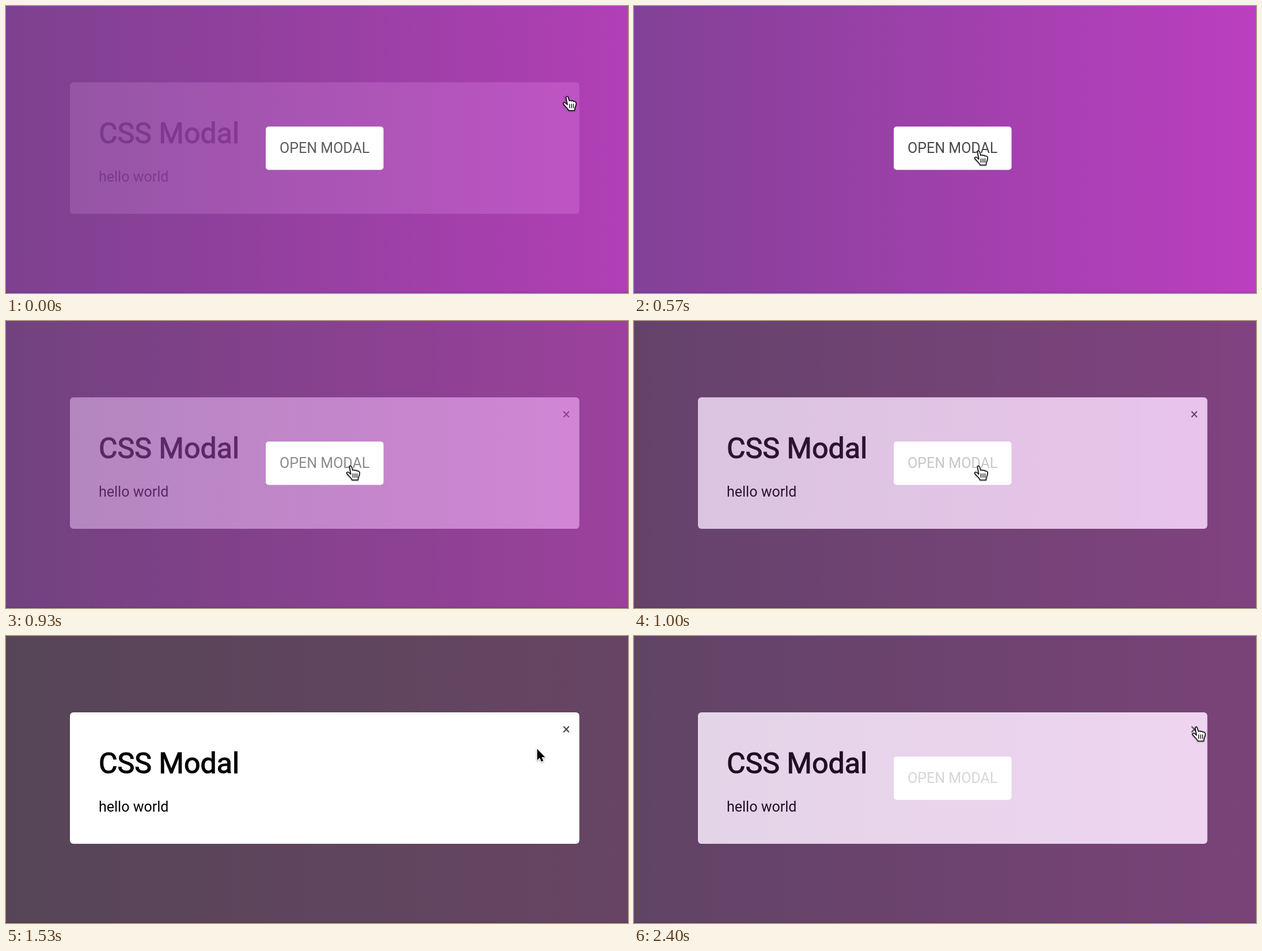
These frames come from a looping animation (1080 px wide and 500 px high, 2.43 s). An HTML page:

```html
<!DOCTYPE html>
<html lang="en">
<head>
<meta charset="utf-8">
<title>CSS Modal</title>
<style>
  html, body { margin: 0; width: 100%; height: 100%; overflow: hidden; }
  svg { display: block; width: 1080px; height: 500px; font: 25px Roboto, Arial, sans-serif; }
  .mid { text-anchor: middle; fill: #484848; }
  #cursor { filter: drop-shadow(0 1.5px 1px rgba(0, 0, 0, .4)); stroke-linejoin: round; stroke-linecap: round; }
</style>
</head>
<body>
<svg viewBox="0 0 1080 500">
  <defs>
    <linearGradient id="bg">
      <stop offset="0" stop-color="rgb(130,65,150)"/>
      <stop offset="1" stop-color="rgb(187,63,192)"/>
    </linearGradient>
  </defs>
  <rect width="1080" height="500" fill="url(#bg)"/>
  <rect x="451" y="210" width="204.5" height="75.5" rx="5" fill="#fff"/>
  <text class="mid" x="553.2" y="256.3">OPEN MODAL</text>

  <g id="modal">
    <rect width="1080" height="500" fill="rgb(70,71,63)" fill-opacity=".71"/>
    <rect x="111" y="133" width="884.5" height="229" rx="6" fill="#fff"/>
    <text x="161" y="238.5" font-size="50" stroke="#000" stroke-width="1.1">CSS Modal</text>
    <text x="161" y="305.5">hello world</text>
    <text class="mid" x="973" y="171.3">×</text>
  </g>
  <rect y="498" width="1080" height="2" opacity=".1"/>

  <g id="cursor">
    <g id="hand" transform="translate(-8 -2)" fill="#fff" stroke="#111" stroke-width="1.6">
      <path d="M6.5 3.5C6 1 9.2.8 10 3L12 9.2C13 8 15.3 8.3 15.8 9.6 17 8.6 19 9 19.5 10.6 21.5 9.8 23.6 10.8 23.9 13 24.2 17 22.5 20 21.7 22L21.3 26H11C10 22.5 4 18 1.8 14.8.8 12.5 3.5 11.6 5.3 13L8.8 16Z"/>
      <path d="M12.5 15v6.5M16 15v6.5M19.4 15v6.5" stroke-width="1.4"/>
    </g>
    <path id="arrow" d="M0 1V20.5L4.4 16.4 7.2 23 10.6 21.5 7.8 15.2H13.6Z" stroke="#fff" stroke-width="2.6" paint-order="stroke"/>
  </g>
</svg>
<script>
const LOOP = 2430, FADE = 400;
const $ = id => document.getElementById(id);
const clamp = u => Math.min(1, Math.max(0, u));
const bezier = (a, b, c, d, s) => {
  const r = 1 - s;
  return r * r * r * a + 3 * r * r * s * b + 3 * r * s * s * c + s * s * s * d;
};

// CSS "ease": cubic-bezier(.25, .1, .25, 1)
function ease(u) {
  let lo = 0, hi = 1;
  for (let i = 0; i < 20; i++) {
    const s = (lo + hi) / 2;
    if (bezier(0, .25, .25, 1, s) < u) lo = s; else hi = s;
  }
  return bezier(0, .1, 1, 1, lo);
}
const fade = (t, start) => ease(clamp((t - start) / FADE));

function opacity(t) {
  if (t < 500) return 1 - fade(t, -242);
  return t < 2333 ? fade(t, 837) : 1 - fade(t, 2333);
}

// Smooth move along a quadratic curve
function glide(t, start, end, a, b, c) {
  const u = clamp((t - start) / (end - start)), s = u * u * (3 - 2 * u), r = 1 - s;
  return a.map((v, i) => r * r * v + 2 * r * s * b[i] + s * s * c[i]);
}

function pointer(t) {
  return t < 800
    ? glide(t, 0, 530, [974, 158], [800, 215], [598, 253])
    : glide(t, 1130, 1723, [598, 253], [895, 242], [976, 159]);
}

function draw(now) {
  const t = now % LOOP, [x, y] = pointer(t);
  const onButton = t < 1130 && x > 451 && x < 655 && y > 210 && y < 285;
  const isHand = onButton || x > 960;
  $("modal").setAttribute("opacity", opacity(t));
  $("cursor").setAttribute("transform", `translate(${x} ${y})`);
  $("hand").setAttribute("visibility", isHand ? "visible" : "hidden");
  $("arrow").setAttribute("visibility", isHand ? "hidden" : "visible");
}

let begin;
function tick(now) {
  begin ??= now;
  draw(now - begin);
  requestAnimationFrame(tick);
}
draw(0);
requestAnimationFrame(tick);
</script>
</body>
</html>
```
